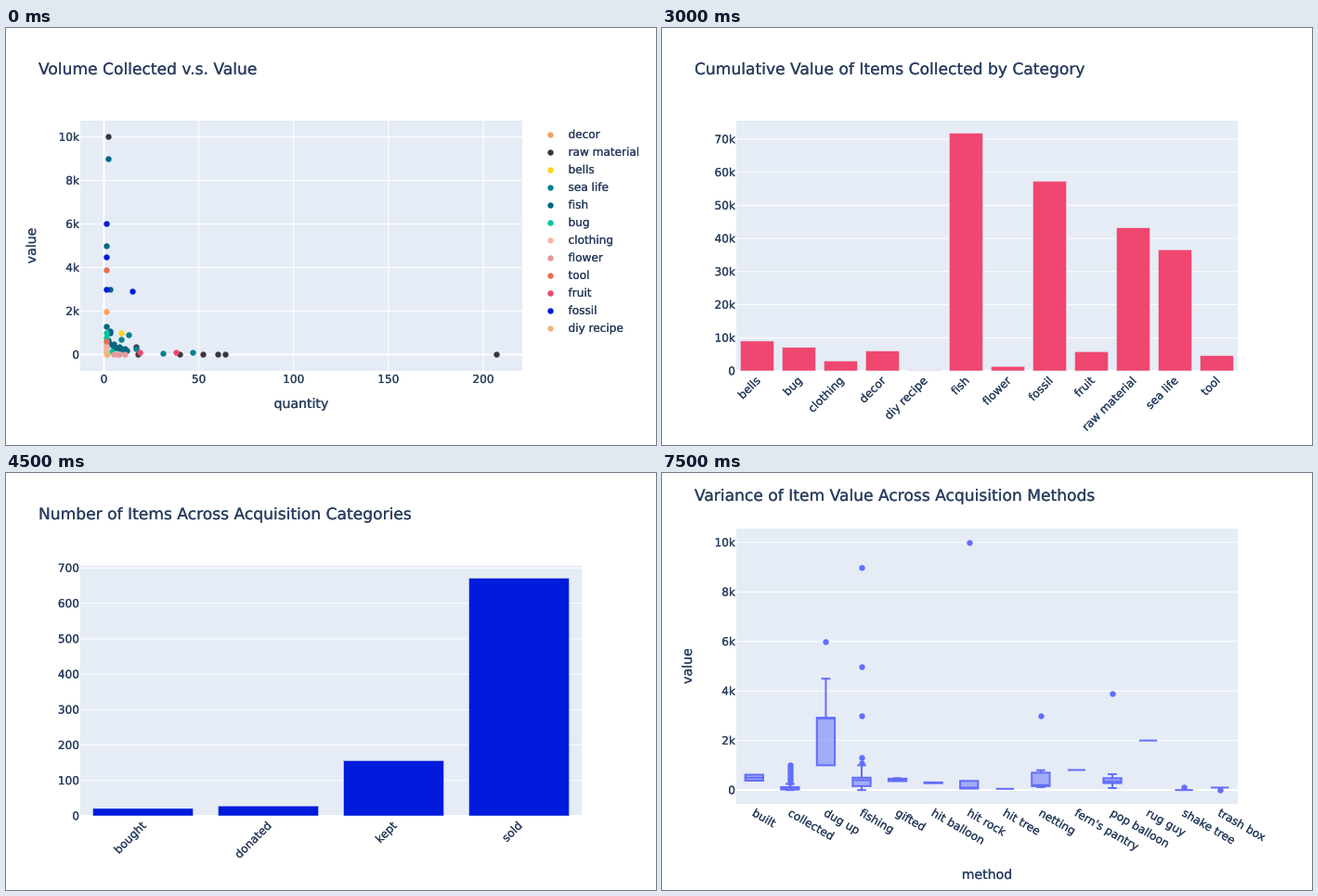
Write a matplotlib script that moves like this. It is 700 by 450 pixels and loops after 8000 ms.

```python
import matplotlib.pyplot as plt
import numpy as np
from matplotlib.animation import FuncAnimation
from matplotlib.patches import Rectangle
from matplotlib.patheffects import withStroke

W, H, DPI = 700, 450, 100
INK, PANEL, BOX = "#2a3f5f", "#e5ecf6", "#636efa"
STEP = 500
HOLDS = [3] * 5 + [1]  # steps each chart stays on screen

plt.rcParams["font.family"] = "DejaVu Sans"
plt.rcParams["text.hinting"] = "none"

fig = plt.figure(figsize=(W / DPI, H / DPI), dpi=DPI, facecolor="white")
ax = fig.add_axes([0, 0, 1, 1])
ax.set_xlim(0, W)
ax.set_ylim(H, 0)
ax.axis("off")


def pt(px):
    return px * 72 / DPI


BOLDER = [withStroke(linewidth=pt(0.2), foreground=INK)]


class Slide:
    """One chart, drawn in stage pixels and shown or hidden as a whole."""

    def __init__(self, title, left=80, top=100, right=620, bottom=370,
                 title_y=50):
        self.parts = []
        self.left, self.top, self.right, self.bottom = left, top, right, bottom
        self.rect(left, top, right - left, bottom - top, PANEL, z=0)
        self.text(35, title_y, title, 17.1)

    def add(self, part):
        self.parts.append(part)
        return part

    def text(self, x, y, s, size=12.1, ha="left", rot=0):
        self.add(ax.text(x, y, s, fontsize=pt(size), color=INK, ha=ha,
                         va="baseline", rotation=rot, rotation_mode="anchor",
                         path_effects=BOLDER))

    def rect(self, x, y, w, h, color, z=2, **kw):
        self.add(ax.add_patch(Rectangle((x, y), w, h, fc=color, zorder=z,
                                        **{"lw": 0, "snap": False, **kw})))

    def line(self, xs, ys, color, width, z=1):
        self.add(ax.plot(xs, ys, color=color, lw=pt(width), zorder=z,
                         solid_capstyle="butt", snap=False)[0])

    def dots(self, xs, ys, color, z=4):
        self.add(ax.scatter(xs, ys, s=pt(6.4) ** 2, c=color, lw=0, zorder=z,
                            snap=False))

    def y_axis(self, lo, hi, ticks, pad=0.05):
        """Fit lo..hi into the panel, padding every end that is padded or nonzero."""
        height = self.bottom - self.top
        low_pad, high_pad = pad if isinstance(pad, tuple) else (pad, pad)
        unit = height * (1 - low_pad - high_pad) / (hi - lo)
        zero = self.bottom - low_pad * height + unit * lo
        self.y = lambda v: zero - unit * v
        for value, label in ticks:
            y = self.y(value)
            self.line([self.left, self.right], [y, y], "white",
                      1 if value else 2)
            self.text(self.left - 1, y + 4.3, label, ha="right")

    def x_title(self, s, y):
        self.text((self.left + self.right) / 2, y, s, 14.1, "center")

    def y_title(self, s):
        self.text(32, (self.top + self.bottom) / 2, s, 14.1, "center", 90)

    def slots(self, n):
        """Width of one category and the centre of each."""
        pitch = (self.right - self.left) / n
        return pitch, self.left + pitch * (np.arange(n) + 0.5)


def ticks(start, stop, step, suffix=""):
    for v in range(start, stop + 1, step):
        yield v, (f"{v}{suffix}" if v else "0").replace("-", "\u2212")


def bar_chart(title, bars, color, marks):
    s = Slide(title)
    lo, hi = min(0, *bars.values()), max(bars.values())
    s.y_axis(lo, hi, marks, (0.05 if lo else 0, 0.05))
    pitch, centres = s.slots(len(bars))
    for x, (name, v) in zip(centres, bars.items()):
        s.rect(x - 0.4 * pitch, s.y(0), 0.8 * pitch, s.y(v) - s.y(0), color,
               ec=PANEL, lw=pt(0.5))
        s.text(x + 4.2, 381.2, name, ha="right", rot=45)
    return s


def column(lo, hi, n):
    return [(1, v) for v in np.linspace(lo, hi, n)]


def strip(height, *quantities):
    return [(q, height) for q in quantities]


def trail(rng, n, last, top):
    """Scattered points whose value fades as quantity grows."""
    q = np.linspace(2, last, n).round()
    return list(zip(q, top * np.exp(-q / 9) * rng.uniform(0.7, 1.2, n)))


def scatter_chart():
    s = Slide("Volume Collected v.s. Value", right=556)
    rng = np.random.default_rng(4)

    def to_x(q):
        return 105.5 + 2.0425 * q

    for q, label in ticks(0, 200, 50):
        s.line([to_x(q)] * 2, [s.top, s.bottom], "white", 1 if q else 2)
        s.text(to_x(q), 383, label, ha="center")
    s.y_axis(0, 10, ticks(0, 10, 2, "k"), 0.0648)
    s.x_title("quantity", 410)
    s.y_title("value")

    # points are (quantity, value in thousands)
    groups = [
        ("decor", "#f4a261", [(1, 2)]),
        ("raw material", "#38383c",
         [(2, 10), (17, .36)] + strip(.04, 18, 40, 52, 60, 64, 207)),
        ("bells", "#ffd21c", [(9, 1)]),
        ("sea life", "#05808f",
         [(47, .12), (31, .05), (17, .28), (13, .9), (9, .7)]
         + trail(rng, 4, 11, .6)),
        ("fish", "#036682",
         [(2, 9), (1, 5), (3, 3), (1, 1.3), (3, 1.1), (3, 1)]
         + trail(rng, 8, 12, .8)),
        ("bug", "#06c39b", column(.2, 1, 5) + [(4, .14)]),
        ("clothing", "#fbb5a3", column(.02, .4, 5)),
        ("flower", "#e5989b", strip(.04, 5, 7, 8, 11)),
        ("tool", "#e76f51", [(1, 3.9), (1, .6)]),
        ("fruit", "#ef476f", strip(.1, 19, 38)),
        ("fossil", "#001bdb", [(1, 6), (1, 4.5), (1, 3), (15, 2.92)]),
        ("diy recipe", "#f1b477", [(1.5, .02)]),
    ]
    for i, (name, color, points) in enumerate(groups):
        q, v = np.transpose(points)
        s.dots(to_x(q), s.y(v), color, 4 + i / 100)
        y = 114.5 + 19 * i
        s.dots([585.5], [y], color)
        s.text(605.5, y + 4.3, name)
    return s


def draw_box(s, x, pitch, q1, q3=None, mid=None, low=None, high=None, out=()):
    """Box at x; anything left out collapses onto the quartiles."""
    half, cap = pitch / 4, pitch / 8
    if len(out):
        s.dots([x] * len(out), s.y(np.array(out)), BOX)
    if q3 is None:
        s.line([x - half, x + half], [s.y(q1)] * 2, BOX, 2, 3)
        return
    mid = (q1 + q3) / 2 if mid is None else mid
    s.rect(x - half, s.y(q1), 2 * half, s.y(q3) - s.y(q1), BOX, alpha=0.5)
    s.rect(x - half, s.y(q1), 2 * half, s.y(q3) - s.y(q1), "none", 3,
           ec=BOX, lw=pt(2))
    s.line([x - half, x + half], [s.y(mid)] * 2, BOX, 2, 3)
    for start, end in ((q1, low), (q3, high)):
        if end is not None:
            s.line([x, x], [s.y(start), s.y(end)], BOX, 2, 3)
            s.line([x - cap, x + cap], [s.y(end)] * 2, BOX, 2, 3)


def box_chart():
    s = Slide("Variance of Item Value Across Acquisition Methods",
              top=60, bottom=357, title_y=30)
    s.y_axis(0, 10, ticks(0, 10, 2, "k"))
    s.x_title("method", 438)
    s.y_title("value")

    boxes = {
        "built": dict(q1=.38, q3=.62),
        "collected": dict(q1=.02, q3=.12, low=0, high=.25,
                          out=np.linspace(.3, 1, 8)),
        "dug up": dict(q1=1, q3=2.92, mid=2.89, high=4.5, out=[6]),
        "fishing": dict(q1=.16, q3=.5, mid=.4, low=0, high=1,
                        out=[1.1, 1.3, 3, 5, 9]),
        "gifted": dict(q1=.36, q3=.46, high=.48),
        "hit balloon": dict(q1=.28, q3=.31),
        "hit rock": dict(q1=.06, q3=.37, mid=.1, out=[10]),
        "hit tree": dict(q1=.05),
        "netting": dict(q1=.16, q3=.7, mid=.2, low=.12, high=.8, out=[3]),
        "fern's pantry": dict(q1=.81),
        "pop balloon": dict(q1=.28, q3=.48, mid=.35, low=.08, high=.64,
                            out=[3.9]),
        "rug guy": dict(q1=2),
        "shake tree": dict(q1=0, out=[.1]),
        "trash box": dict(q1=.1, out=[.02]),
    }
    pitch, centres = s.slots(len(boxes))
    for x, (name, stats) in zip(centres, boxes.items()):
        draw_box(s, x, pitch, **stats)
        s.text(x - 3, 369.2, name, rot=-30)
    return s


counts = dict(bells=9, bug=13, clothing=8, decor=14) | {"diy recipe": 1} | dict(
    fish=90, flower=34, fossil=18, fruit=57) | {
    "raw material": 473, "sea life": 136, "tool": 2}
worth = dict(zip(counts, [9, 7.1, 3, 6, .1, 71.8, 1.35, 57.3, 5.8, 43.2,
                          36.6, 4.6]))

slides = [
    scatter_chart(),
    bar_chart("Number of Items Collected by Category", counts,
              "#e5989b", ticks(0, 400, 100)),
    bar_chart("Cumulative Value of Items Collected by Category", worth,
              "#ef476f", ticks(0, 70, 10, "k")),
    bar_chart("Number of Items Across Acquisition Categories",
              dict(bought=21, donated=28, kept=156, sold=671),
              "#001bdb", ticks(0, 700, 100)),
    bar_chart("Net Gains Across Acquisition Categories",
              dict(bought=-40.7, donated=-74, kept=27.6, sold=147.4),
              "#04c49b", ticks(-50, 150, 50, "k")),
    box_chart(),
]
order = np.repeat(np.arange(len(slides)), HOLDS)


def show(frame):
    for i, s in enumerate(slides):
        for part in s.parts:
            part.set_visible(i == order[frame])
    return []


anim = FuncAnimation(fig, show, frames=len(order), init_func=lambda: show(0),
                     interval=STEP, repeat=True, repeat_delay=0, blit=False)
plt.show()
```
